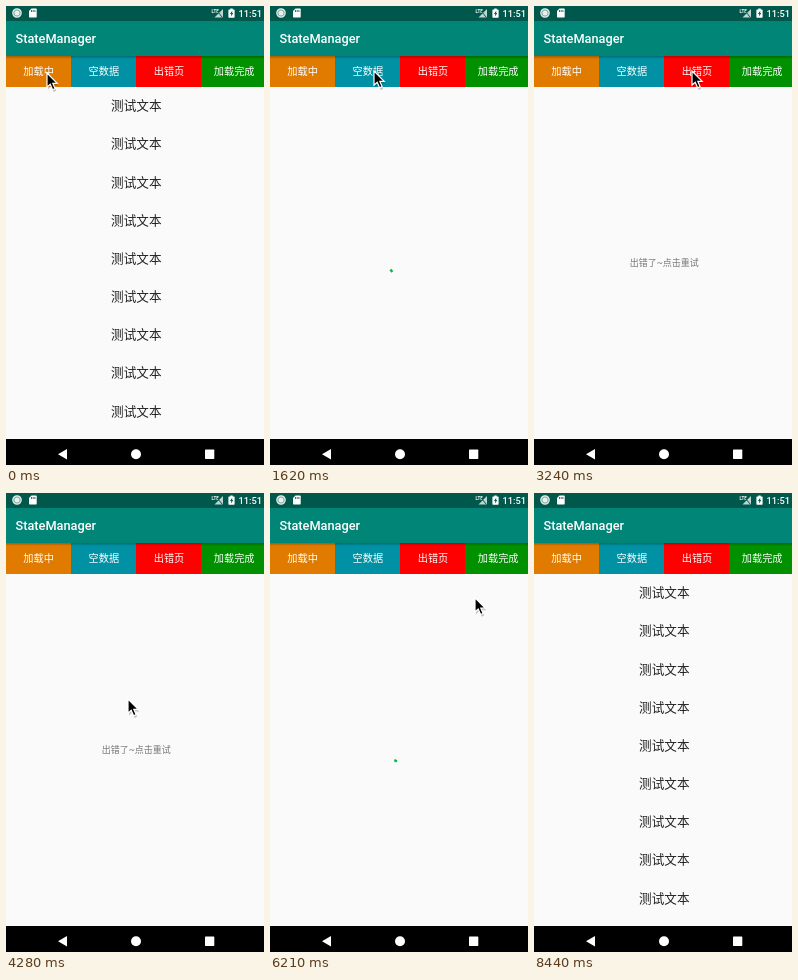
Write an HTML page that moves like this. It is 258 px wide and 459 px high and loops after 8590 ms.

```html
<!DOCTYPE html>
<html lang="zh-CN">
<head>
<meta charset="utf-8">
<style>
html, body { margin: 0; width: 100%; height: 100%; overflow: hidden; background: #fafafa; }
svg { display: block; width: 258px; height: 459px; }
text { font-family: Roboto, "Noto Sans CJK SC", "Noto Sans CJK", sans-serif; }
.mid { text-anchor: middle; }
</style>
</head>
<body>
<svg viewBox="0 0 258 459">
  <defs>
    <linearGradient id="shade" x2="0" y2="1">
      <stop offset="0" stop-opacity=".26"/>
      <stop offset="1" stop-opacity="0"/>
    </linearGradient>
  </defs>

  <rect id="page" y="80" width="258" height="353" fill="#fafafa"/>

  <g id="list" class="mid" font-size="12.6" fill="#202020"></g>

  <g id="empty">
    <g fill="none" stroke="#7d7d7d" stroke-width="1.8" stroke-linecap="round" stroke-linejoin="round">
      <path d="M116 233v-2.5q0-2 2-2h27q2 0 2 2V264h-6M149 264h4.500"/>
      <path d="M109 269V235.500q0-2 2-2h27q2 0 2 2V269M94 269.200h6M103 269.200h25M134 269.200h6"/>
      <path d="M115 239h12M115 243.500h17M115 248h17M127 253h5" stroke-width="1.500"/>
      <circle cx="121" cy="259" r="6" fill="#e9e9e9"/>
      <path d="M125.500 263.500l3 2.500"/>
      <path d="M129 266.500l5 5" stroke-width="3.200"/>
      <circle cx="95" cy="239.700" r="2.200" stroke-width="1.500"/>
      <circle cx="158" cy="233.700" r="2.200" stroke-width="1.500"/>
      <path d="M104 224.200v5M101.500 226.700h5" stroke-width="1.500"/>
    </g>
    <g fill="#8a8a8a">
      <circle cx="99" cy="258" r="1.400"/>
      <circle cx="166" cy="254" r="1.400"/>
    </g>
    <text class="mid" x="130.300" y="287.500" font-size="10.050" fill="#9c9c9c">这里空空如也~</text>
  </g>

  <text id="error" class="mid" x="130.300" y="260" font-size="9" fill="#757575">出错了~点击重试</text>
  <path id="spinner" fill="none" stroke="#12b04a" stroke-width="2.500" stroke-linecap="square"/>

  <rect width="258" height="15" fill="#00574b"/>
  <rect y="15" width="258" height="35" fill="#008577"/>
  <text x="9.500" y="37" font-size="12.750" font-weight="500" fill="#fff">StateManager</text>

  <g id="status" fill="#fff">
    <circle cx="11" cy="7" r="4.200" fill="#7fa9a2" stroke="#e6f0ee" stroke-width="1.200"/>
    <circle cx="11" cy="7" r="2.500" fill="#e8f1ef"/>
    <path d="M25.500 2.500H30q.7 0 .7.700v7.600q0 .7-.7.700h-6.300q-.7 0-.7-.7V5z"/>
    <path d="M25.500 4v2M27.200 4v2M28.900 4v2" stroke="#00574b" stroke-width=".8"/>
    <text x="205.500" y="6.500" font-size="4.500" font-weight="700">LTE</text>
    <path d="M217 3v8.500h-8.500z" fill-opacity=".75"/>
    <path d="M211.500 5.500l5 6" stroke="#00574b"/>
    <path d="M224.300 2.500h2.400v1h1.300q.6 0 .6.600v7q0 .6-.6.600h-5q-.6 0-.6-.6v-7q0-.6.6-.6h1.300z"/>
    <path d="M226.200 4.800l-2.200 3.300h1.200v2.400l2-3.400h-1z" fill="#00574b"/>
    <text x="256" y="10.500" font-size="9.300" font-weight="500" text-anchor="end">11:51</text>
  </g>

  <g id="tabs" class="mid" font-size="10.200"></g>
  <rect y="50" width="258" height="3" fill="url(#shade)"/>

  <rect y="433" width="258" height="26"/>
  <g fill="#fff">
    <path d="M52 448.200l9-5.200v10.400z"/>
    <circle cx="130" cy="448.200" r="5"/>
    <rect x="199" y="443.600" width="9.300" height="9.300" rx=".6"/>
  </g>

  <g id="cursor">
    <path d="M1 2V16.500l3.200-3 2.400 5.400 2.700-1.200-2.300-5.200h4.400z" opacity=".22"/>
    <path d="M0 0V14.200l3.200-3 2.400 5.500 2.500-1.100-2.300-5.300h4.400z" stroke="#fff" stroke-width="1.200"/>
  </g>
</svg>
<script>
const LOOP = 8590, STEP = 148.07, LEAD = 20, LAST = 57;
const $ = id => document.getElementById(id);

const tabs = [["加载中", "#e07b00"], ["空数据", "#0092a4"], ["出错页", "#ff0000"], ["加载完成", "#009000"]];
$("tabs").innerHTML = tabs.map(([label, color], i) =>
  `<rect x="${i * 65}" y="50" width="65" height="31" fill="${color}"/>
   <text x="${i * 65.2 + 32.6}" y="69" fill="#fff">${label}</text>`).join("");
$("list").innerHTML = Array.from({ length: 9 }, (_, i) =>
  `<text x="130.300" y="${104.2 + i * 38.18}">测试文本</text>`).join("");

// first step of each view
const views = [[0, "list"], [2, "spinner"], [13, "empty"], [22, "error"], [34, "spinner"], [49, "list"]];

// step, x, y
const cursorPath = [
  [0, 41, 67], [1, 40, 67], [8, 40, 67], [11, 104, 65], [12, 105, 66], [17, 105, 66],
  [18, 122, 65], [21, 158, 65], [28, 158, 65], [29, 122, 206], [32, 125, 254], [37, 125, 254],
  [43, 221, 75], [44, 227, 68], [53, 227, 68], [54, 224, 140], [56, 207, 440]
];

const bezier = (a, b, c, d, s) => {
  const r = 1 - s;
  return r * r * r * a + 3 * r * r * s * b + 3 * r * s * s * c + s * s * s * d;
};

function ease(u, x0, x1, x2, x3) {
  if (u <= x0) return 0;
  if (u >= x3) return 1;
  let lo = 0, hi = 1;
  for (let i = 0; i < 24; i++) {
    const s = (lo + hi) / 2;
    if (bezier(x0, x1, x2, x3, s) < u) lo = s; else hi = s;
  }
  return bezier(0, 0, 1, 1, lo);
}

function cursorAt(step) {
  const next = cursorPath.findIndex(key => key[0] > step);
  if (next < 0) return cursorPath[cursorPath.length - 1].slice(1);
  const [s0, x0, y0] = cursorPath[next - 1], [s1, x1, y1] = cursorPath[next];
  const k = (step - s0) / (s1 - s0);
  return [x0 + (x1 - x0) * k, y0 + (y1 - y0) * k];
}

// Material indeterminate ring: a trimmed arc that grows, shrinks and turns
function ringPath(age) {
  const u = age / 1333 % 1;
  const turn = age / 4444 * 720 + u * 90 - 90;
  const from = turn + 270 * ease(u, 0.5, 0.7, 0.6, 1);
  const to = Math.max(from + 2, turn + 270 * ease(u, 0, 0.2, 0.1, 0.5));
  const point = deg => {
    const a = deg * Math.PI / 180;
    return `${130 + 11.6 * Math.cos(a)} ${257 + 11.6 * Math.sin(a)}`;
  };
  return `M${point(from)}A11.6 11.6 0 ${to - from > 180 ? 1 : 0} 1 ${point(to)}`;
}

function draw(time) {
  const step = Math.min(LAST, Math.floor((time % LOOP + LEAD) / STEP));
  const view = views.filter(v => v[0] <= step).pop()[1];
  for (const id of ["list", "spinner", "empty", "error"])
    $(id).style.display = id === view ? "" : "none";
  $("page").setAttribute("fill", view === "empty" ? "#e9e9e9" : "#fafafa");
  if (view === "spinner")
    $("spinner").setAttribute("d", ringPath(step * STEP - (step < 13 ? 250 : 4945)));
  const [x, y] = cursorAt(step);
  $("cursor").setAttribute("transform", `translate(${x} ${y})`);
  $("cursor").style.display = step < LAST ? "" : "none";
}

const begin = performance.now();
function tick() {
  draw(performance.now() - begin);
  requestAnimationFrame(tick);
}
tick();
</script>
</body>
</html>
```
